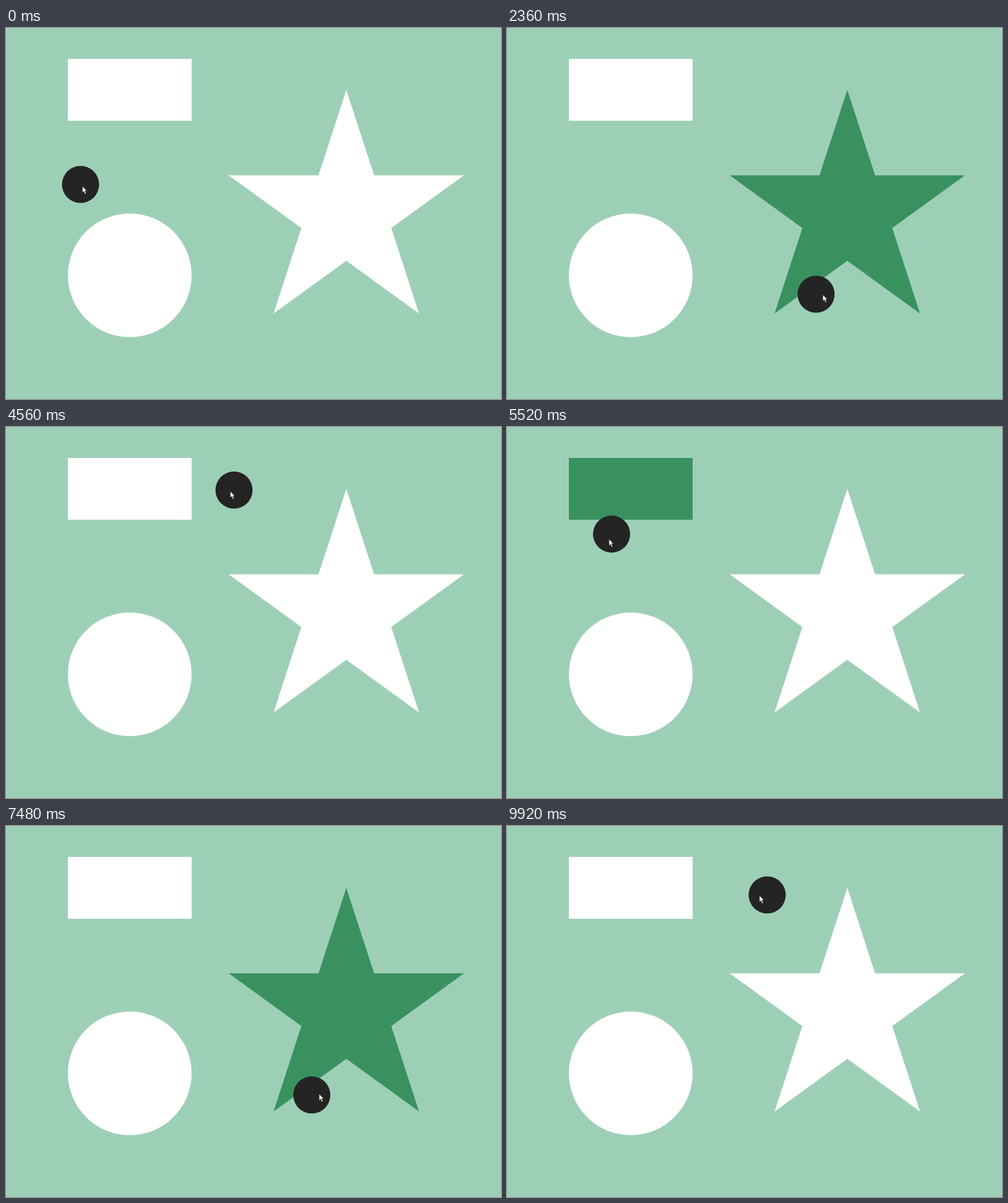
These frames come from a looping animation (800x600 px, 9960 ms). An HTML page:

```html
<!DOCTYPE html>
<html lang="en">
<head>
<meta charset="utf-8">
<title>Shape collisions</title>
<style>
  html, body { margin: 0; width: 100%; height: 100%; overflow: hidden; background: #9dcfb7; }
  svg { display: block; width: 100%; height: 100%; }
</style>
</head>
<body>
<svg viewBox="0 0 800 600">
  <rect width="800" height="600" fill="#9dcfb7"/>
  <rect id="box" x="100" y="50" width="200" height="100"/>
  <circle id="disc" cx="200" cy="400" r="100"/>
  <polygon id="star"/>
  <circle id="ball" r="30" fill="#242424"/>
  <path id="pointer" d="M0 0V10.2L2.3 8.1L4.3 12.6L6.1 11.8L4.1 7.4H7.2Z" fill="#fff" stroke="#111" stroke-width=".5"/>
</svg>
<script>
const LOOP = 9960, STEP = 40, RADIUS = 30;
const IDLE = '#fff', HIT = '#3a9160';
const el = id => document.getElementById(id);
const box = el('box'), disc = el('disc'), star = el('star');
const ball = el('ball'), pointer = el('pointer');

// Each stop: time, x, y and, where it matters, the speed in px per step
const stops = [
  [0, 120.5, 253, 3, 3], [500, 150, 300], [1000, 185, 375], [1500, 265, 412],
  [2000, 398, 425], [2360, 499.5, 430.5, 11, 1], [2640, 570, 445],
  [3000, 630, 372], [3260, 640, 260], [3520, 651.5, 218.5, 2, -3],
  [3760, 657, 196], [4000, 590, 140], [4280, 440, 98],
  [4560, 368.5, 102, -6, 2], [4800, 330, 112], [5000, 267, 118],
  [5300, 200, 135], [5600, 162, 190], [6000, 150, 283],
  [6440, 163.5, 350.5, 6, 9], [6700, 245, 405], [7000, 341, 412],
  [7300, 435, 431], [7500, 500, 434], [7800, 575, 400], [8040, 600, 350],
  [8400, 592, 278], [8760, 621.5, 230.5, 5, -4], [9000, 650, 185],
  [9280, 622, 145], [9520, 545, 120], [9700, 488, 114],
  [9920, 420.5, 111.5, -12.5, 1]
].map(([t, x, y, vx, vy]) => ({ t, p: [x, y], v: vx === undefined ? null : [vx / STEP, vy / STEP] }));

stops.forEach((s, i) => {
  if (s.v) return;
  const a = stops[i - 1], b = stops[i + 1];
  s.v = [0, 1].map(k => (b.p[k] - a.p[k]) / (b.t - a.t));
});

const corners = Array.from({ length: 10 }, (_, i) => {
  const r = i % 2 ? 76.39 : 200, a = (i * 36 - 90) * Math.PI / 180;
  return [550 + r * Math.cos(a), 300 + r * Math.sin(a)];
});
star.setAttribute('points', corners.join(' '));

const clamp = (v, lo, hi) => Math.min(hi, Math.max(lo, v));

// Cubic Hermite position and speed
function motion(t) {
  let i = 0;
  while (i < stops.length - 2 && t >= stops[i + 1].t) i++;
  const a = stops[i], b = stops[i + 1], d = b.t - a.t, u = (t - a.t) / d;
  const at = k => {
    const m = a.v[k] * d, n = b.v[k] * d, gap = b.p[k] - a.p[k];
    const c2 = 3 * gap - 2 * m - n, c3 = m + n - 2 * gap;
    return [a.p[k] + u * (m + u * (c2 + u * c3)), (m + u * (2 * c2 + 3 * u * c3)) / d];
  };
  const [x, vx] = at(0), [y, vy] = at(1);
  return { x, y, vx, vy };
}

const hitsBox = (x, y) =>
  Math.hypot(x - clamp(x, 100, 300), y - clamp(y, 50, 150)) <= RADIUS;

const hitsDisc = (x, y) => Math.hypot(x - 200, y - 400) <= 100 + RADIUS;

function hitsStar(x, y) {
  let inside = false, near = false;
  corners.forEach(([ax, ay], i) => {
    const [bx, by] = corners[(i + 1) % corners.length];
    const dx = bx - ax, dy = by - ay;
    const u = clamp(((x - ax) * dx + (y - ay) * dy) / (dx * dx + dy * dy), 0, 1);
    if (Math.hypot(x - ax - u * dx, y - ay - u * dy) <= RADIUS) near = true;
    if ((ay > y) !== (by > y) && x < ax + dx * (y - ay) / dy) inside = !inside;
  });
  return near || inside;
}

function draw(now) {
  const t = Math.floor(now % LOOP / STEP) * STEP;
  const { x, y, vx, vy } = motion(t);
  const paint = (shape, hit) => shape.setAttribute('fill', hit ? HIT : IDLE);
  paint(box, hitsBox(x, y));
  paint(disc, hitsDisc(x, y));
  paint(star, hitsStar(x, y));
  ball.setAttribute('cx', x);
  ball.setAttribute('cy', y);
  // The ball trails the pointer by one step
  pointer.setAttribute('transform', `translate(${x + vx * STEP} ${y + vy * STEP})`);
}

let start;
function tick(now) {
  start ??= now;
  draw(now - start);
  requestAnimationFrame(tick);
}
draw(0);
requestAnimationFrame(tick);
</script>
</body>
</html>
```
